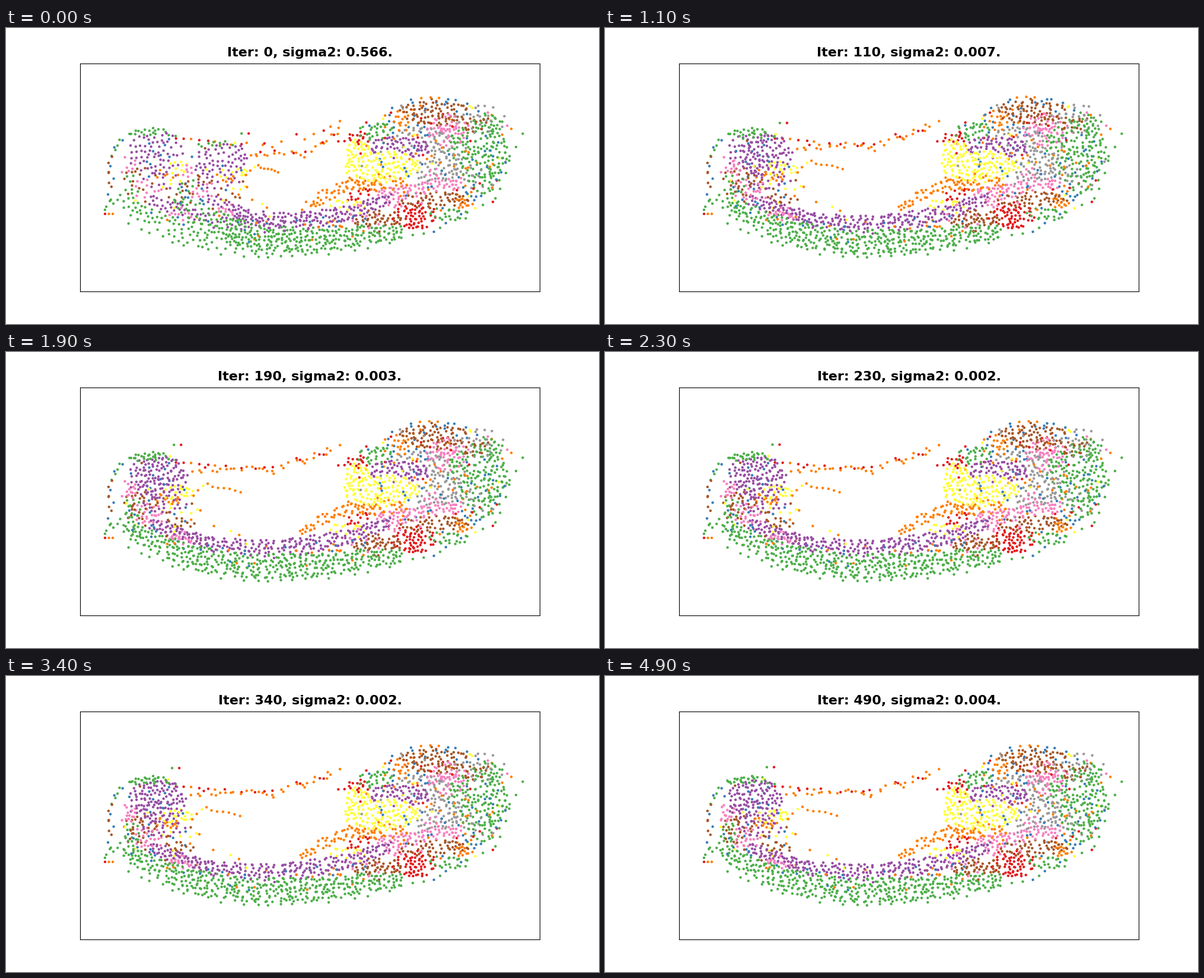
Animation of 1000 by 500 pixels, one loop 5000 ms. Source, as a matplotlib script:

```python
import numpy as np
import matplotlib.pyplot as plt
from matplotlib.animation import FuncAnimation

FRAMES, INTERVAL = 50, 100
DOT_AREA = 90  # mean area per dot, in square pixels
COLORS = dict(red="#e41a1c", blue="#377eb8", green="#4daf4a", purple="#984ea3",
              orange="#ff7f00", yellow="#ffff33", brown="#a65628",
              pink="#f781bf", gray="#999999")
rng = np.random.default_rng(11)


class Cloud:
    """Coloured dots that keep some distance from each other."""

    def __init__(self):
        self.xy, self.color = [], []

    def add(self, color, point):
        self.xy.append(point)
        self.color.append(COLORS[color])

    def fill(self, color, area, sample):
        for _ in range(max(1, round(area / DOT_AREA))):
            cand = sample(5)
            gaps = np.linalg.norm(cand[:, None] - np.array(self.xy), axis=2)
            self.add(color, cand[gaps.min(axis=1).argmax()])

    def blob(self, color, cx, cy, rx, ry, density=1.0):
        def sample(k):
            r, a = 1.12 * rng.random(k) ** .55, rng.uniform(0, 2 * np.pi, k)
            return np.c_[cx + rx * r * np.cos(a), cy + ry * r * np.sin(a)]
        self.fill(color, np.pi * rx * ry * density, sample)

    def band(self, color, *knots, density=1.0):
        """Knots are (x, y, half height)."""
        kx, ky, kh = np.array(knots, float).T

        def sample(k):
            x = rng.uniform(kx[0], kx[-1], k)
            h = np.interp(x, kx, kh) * rng.uniform(-1, 1, k)
            return np.c_[x, np.interp(x, kx, ky) + h]
        area = np.sum(np.diff(kx) * (kh[1:] + kh[:-1]))
        self.fill(color, area * density, sample)

    def path(self, colors, n, *knots, jitter=0.0):
        """Evenly spaced dots along a line, cycling through the colors."""
        knots = np.array(knots, float)
        length = np.r_[0, np.cumsum(np.hypot(*np.diff(knots, axis=0).T))]
        for i, s in enumerate(np.linspace(0, length[-1], n)):
            p = np.array([np.interp(s, length, k) for k in knots.T])
            self.add(colors[i % len(colors)], p + rng.normal(0, 1, 2) * jitter)

    def shuffled(self):
        order = rng.permutation(len(self.xy))
        return np.array(self.xy)[order], np.array(self.color)[order]


def lower_rim(c):
    c.band("green", (206, 300, 14), (240, 318, 18), (300, 345, 20),
           (400, 362, 21), (540, 360, 20), (600, 350, 17), (668, 346, 11))
    c.band("purple", (242, 290, 10), (345, 326, 12), (460, 335, 17),
           (580, 312, 12), (650, 287, 9), density=1.05)
    c.band("orange", (492, 310, 5), (530, 284, 10), (575, 265, 10))
    for color in ("blue", "orange"):
        c.band(color, (270, 325, 15), (430, 348, 20), (610, 335, 20),
               density=.06)


def left_lobe(c):
    c.blob("purple", 252, 211, 42, 33, 1.25)
    c.blob("purple", 262, 252, 36, 18, .5)
    c.blob("green", 245, 178, 36, 7)
    c.blob("green", 208, 282, 14, 32, .6)
    c.blob("pink", 207, 234, 12, 17)
    c.blob("pink", 238, 275, 22, 20, .7)
    c.blob("pink", 298, 314, 24, 11)
    c.blob("brown", 217, 260, 16, 24, .8)
    c.blob("brown", 285, 300, 30, 18, .3)
    c.blob("yellow", 280, 236, 25, 11, .9)
    c.blob("orange", 268, 247, 20, 9)
    for color, density in (("blue", .09), ("yellow", .04), ("brown", .04)):
        c.blob(color, 250, 250, 52, 75, density)


def right_lobe(c):
    c.blob("yellow", 634, 234, 58, 24, 1.15)
    c.blob("yellow", 594, 212, 18, 22)
    c.blob("yellow", 575, 306, 32, 16, .4)
    c.blob("purple", 660, 203, 50, 17, 1.05)
    c.blob("gray", 725, 230, 42, 27, .8)
    c.blob("gray", 690, 186, 50, 16, .5)
    c.blob("gray", 786, 246, 15, 15, .7)
    c.blob("gray", 800, 155, 38, 22, .4)
    c.blob("green", 793, 211, 47, 44, .85)
    c.blob("green", 812, 162, 22, 16, .9)
    c.blob("green", 625, 176, 27, 15, .9)
    c.blob("green", 745, 316, 30, 12, .7)
    c.blob("green", 806, 262, 18, 18, .5)
    c.blob("brown", 722, 142, 53, 20, 1.05)
    c.blob("brown", 796, 163, 22, 14, .7)
    c.blob("brown", 722, 291, 52, 13)
    c.blob("brown", 628, 325, 36, 17, 1.1)
    c.blob("pink", 747, 173, 34, 25, .95)
    c.blob("pink", 672, 284, 42, 18, .9)
    c.blob("pink", 735, 258, 34, 20, .8)
    c.blob("pink", 605, 320, 32, 20, .2)
    c.blob("red", 688, 316, 34, 22, 1.1)
    c.blob("red", 605, 285, 32, 14, .4)
    c.blob("red", 594, 186, 18, 9)
    c.blob("orange", 622, 262, 50, 13)
    c.blob("orange", 667, 160, 12, 20)
    c.blob("orange", 767, 293, 13, 13)
    scattered = dict(blue=.1, orange=.06, gray=.02, red=.02, yellow=.015)
    for color, density in scattered.items():
        c.blob(color, 720, 215, 112, 88, density)


def fixed_cloud():
    c = Cloud()
    # outer rims
    c.path(["green", "green", "blue"], 6, (178, 212), (192, 190), jitter=3)
    c.path(["brown", "brown", "blue"], 9, (176, 218), (172, 238), (182, 262),
           (178, 281), jitter=4)
    c.path(["green"], 10, (217, 174), (255, 170), (285, 184), jitter=2)
    c.path(["green"], 8, (160, 303), (185, 290), (200, 278), jitter=5)
    c.path(["red", "orange", "orange"], 3, (167, 314), (180, 314))
    c.path(["green"], 26, (207, 329), (291, 363), (333, 375), (391, 384),
           (446, 387), (545, 380), (606, 372), (645, 358), (705, 348), jitter=2)
    c.path(["blue", "green"], 6, (721, 341), (776, 310), jitter=3)
    c.path(["green", "yellow", "green", "red"], 4, (773, 309), (822, 296),
           jitter=2)
    c.path(["green"], 8, (827, 288), (837, 260), (853, 205), (865, 181),
           jitter=3)
    c.path(["orange", "pink", "green", "green"], 6, (851, 169), (814, 141),
           jitter=3)
    # upper strand
    c.path(["red", "red", "orange"], 6, (285, 186), (332, 189), (355, 190),
           jitter=2)
    c.path(["orange", "orange", "red"], 14, (365, 201), (430, 197), (497, 185),
           (560, 162), jitter=5)
    c.path(["red"], 5, (558, 193), (590, 187), (609, 160), jitter=3)
    lower_rim(c)
    left_lobe(c)
    right_lobe(c)
    return c.shuffled()


def moving_cloud():
    c = Cloud()
    c.path(["green", "red"], 2, (273, 154), (285, 154))
    c.path(["orange"], 7, (333, 221), (344, 228), (368, 229), (391, 236))
    c.path(["yellow", "orange"], 8, (325, 226), (308, 240), (318, 267),
           (300, 280), jitter=4)
    c.path(["orange", "yellow"], 4, (349, 293), (410, 321), jitter=4)
    c.path(["orange", "orange", "orange", "red"], 26, (303, 197), (340, 202),
           (380, 196), (440, 196), (505, 178), (547, 165), jitter=4)
    lower_rim(c)
    left_lobe(c)
    right_lobe(c)
    return c.shuffled()


still, still_color = fixed_cloud()
home, home_color = moving_cloud()

# iteration, remaining stretch, sideways slide, sigma2
KEYS = np.array([(0, 1, 0, .566), (60, 1, -31, .021), (110, .22, -5, .007),
                 (190, .1, -2, .003), (280, .08, -1, .001),
                 (400, .05, 0, .004), (490, 0, 0, .004)])


def state(it):
    """Stretch, slide and sigma2, easing out towards each key."""
    its = KEYS[:, 0]
    pos = np.interp(it, its, np.arange(len(its)))
    pos = np.floor(pos) + 1 - (1 - pos % 1) ** 1.5
    stretch, slide, log_sigma = (np.interp(pos, np.arange(len(its)), v) for v in
                                 (KEYS[:, 1], KEYS[:, 2], np.log(KEYS[:, 3])))
    return stretch, slide, np.exp(log_sigma)


def pose(stretch, slide):
    """Left part squeezed inward and sheared, then the whole slid and tilted."""
    x, y = home.T
    fade = np.clip((580 - x) / 130, 0, 1)
    dx = np.clip(.36 * (580 - x), 0, 104) + .25 * (235 - y) * fade
    dy = np.maximum(.2 * (275 - y), -6) * fade
    tilt = -slide / 1000
    return np.c_[x + stretch * dx + slide + tilt * (y - 250),
                 y + stretch * dy - tilt * (x - 500)]


fig, ax = plt.subplots(figsize=(10, 5), dpi=100)
ax.set(xlim=(125, 900), ylim=(445, 60), xticks=[], yticks=[])
ax.scatter(*still.T, s=10, c=still_color, linewidths=0)
cloud = ax.scatter(*home.T, s=10, c=home_color, linewidths=0)
title = ax.set_title("", fontsize=16, fontweight="bold", family="DejaVu Sans",
                     pad=8.4)


def draw(i):
    it = 10 * i
    stretch, slide, sigma2 = state(it)
    cloud.set_offsets(pose(stretch, slide))
    title.set_text(f"Iter: {it}, sigma2: {sigma2:.3f}.")
    return cloud, title


anim = FuncAnimation(fig, draw, frames=FRAMES, interval=INTERVAL, repeat=True)
plt.show()
```
